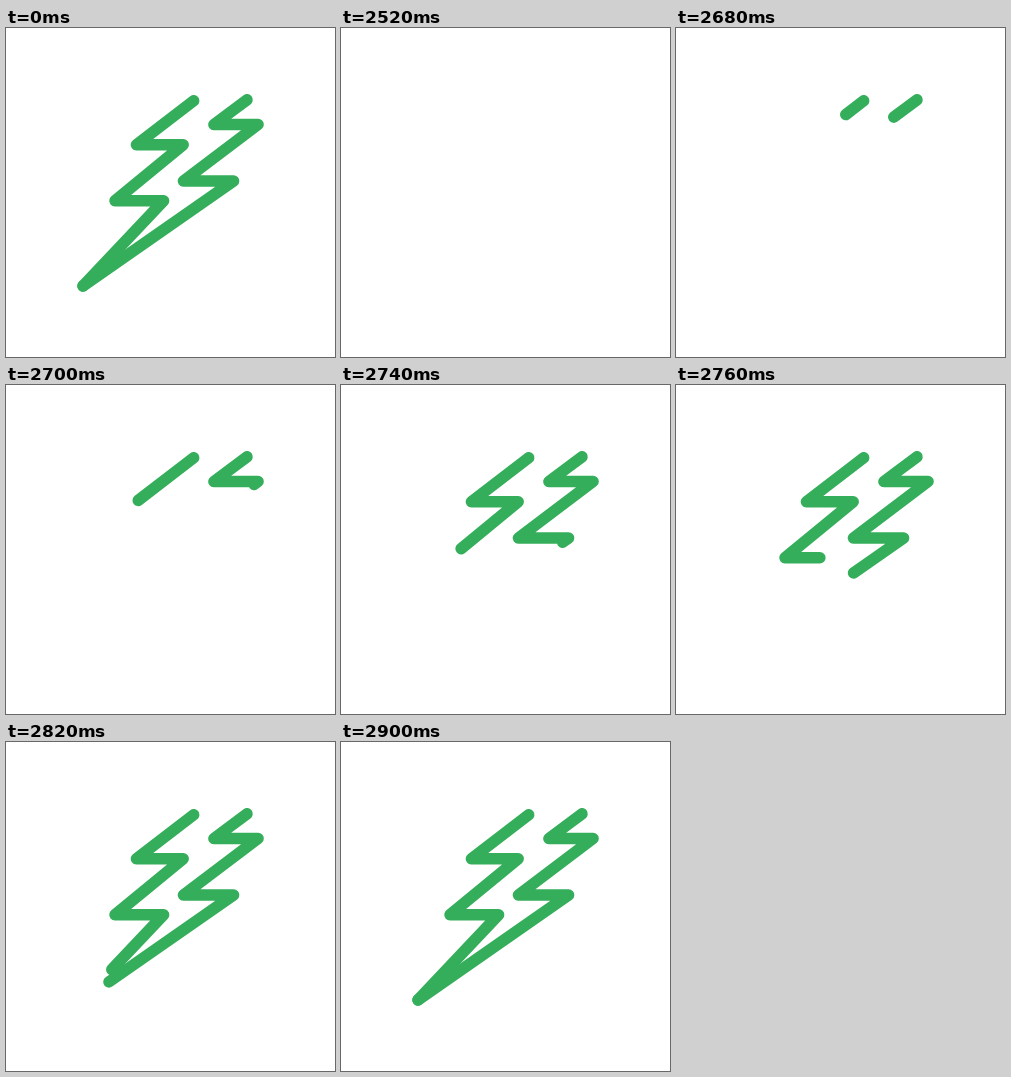
Animation of 329 by 329 pixels, one loop 3 s. Source, as an HTML page with a canvas:

```html
<!DOCTYPE html>
<html lang="en">
<head>
<meta charset="utf-8">
<title>Lightning bolt</title>
<style>
  html, body { margin: 0; width: 100%; height: 100%; overflow: hidden; background: #fff; }
  canvas { display: block; width: 329px; height: 329px; }
</style>
</head>
<body>
<canvas id="stage" width="329" height="329"></canvas>
<script>
const ctx = document.getElementById('stage').getContext('2d');
const SIZE = 329, GREEN = '#34ae5a';
const LOOP = 3000, BLANK = 2520, SOLID = 2600, DRAW = 2660, SHOW = 2680, DONE = 2900, STEP = 20;

const point = (x, y) => ({ x, y });
const tip = point(77, 258);

// A zigzag alternates between a left and a right corner on each level.
function zigzag(top, levels) {
  return [top, ...levels.flatMap(([y, left, right]) => [point(left, y), point(right, y)]), tip];
}

const leftEdge = makeEdge(zigzag(point(187.7, 72.8), [[116.8, 130.4, 177.2], [172.8, 109, 157.6]]), 265);
const rightEdge = makeEdge(zigzag(point(241, 71.8), [[96.5, 207.9, 252.1], [153, 177.4, 227.6]]), 241);
const edges = [leftEdge, rightEdge];

// The solid bolt follows both edges, nudged right, with a flat top.
const solid = [point(187, 67.5), ...leftEdge.points.slice(1, -1), tip,
  ...rightEdge.points.slice(1, -1).reverse(), point(242, 66.5)];

function makeEdge(points, duration) {
  const length = points.slice(1).reduce((sum, p, i) =>
    sum + Math.hypot(p.x - points[i].x, p.y - points[i].y), 0);
  return { points, duration, length };
}

// cubic-bezier(.25, .1, .25, 1)
function ease(x) {
  let lo = 0, hi = 1;
  for (let i = 0; i < 24; i++) {
    const s = (lo + hi) / 2;
    if (0.75 * s * (1 - s) + s ** 3 < x) lo = s; else hi = s;
  }
  return 0.3 * lo * (1 - lo) ** 2 + 3 * lo * lo * (1 - lo) + lo ** 3;
}

function trace(points) {
  ctx.beginPath();
  points.forEach(p => ctx.lineTo(p.x, p.y));
}

function fillBolt() {
  const nudge = 2;
  trace(solid.map(p => p.y < 70 ? p : point(p.x + nudge, p.y)));
  ctx.fill();
}

function strokeEdge({ points, length }, share) {
  trace(points);
  ctx.setLineDash(share < 1 ? [length * share, length * 2] : []);
  ctx.stroke();
}

function render(ms) {
  ctx.fillStyle = '#fff';
  ctx.fillRect(0, 0, SIZE, SIZE);
  ctx.fillStyle = ctx.strokeStyle = GREEN;
  ctx.lineWidth = 11.5;
  ctx.lineCap = ctx.lineJoin = 'round';

  if (ms < BLANK || ms >= DONE) {
    edges.forEach(edge => strokeEdge(edge, 1));
  } else if (ms >= SHOW) {
    const elapsed = Math.floor(ms / STEP) * STEP - DRAW;
    edges.forEach(edge => strokeEdge(edge, ease(elapsed / edge.duration)));
  } else if (ms >= SOLID) {
    fillBolt();
  }
}

const start = performance.now();
function frame() {
  render((performance.now() - start) % LOOP);
  requestAnimationFrame(frame);
}
frame();
</script>
</body>
</html>
```
